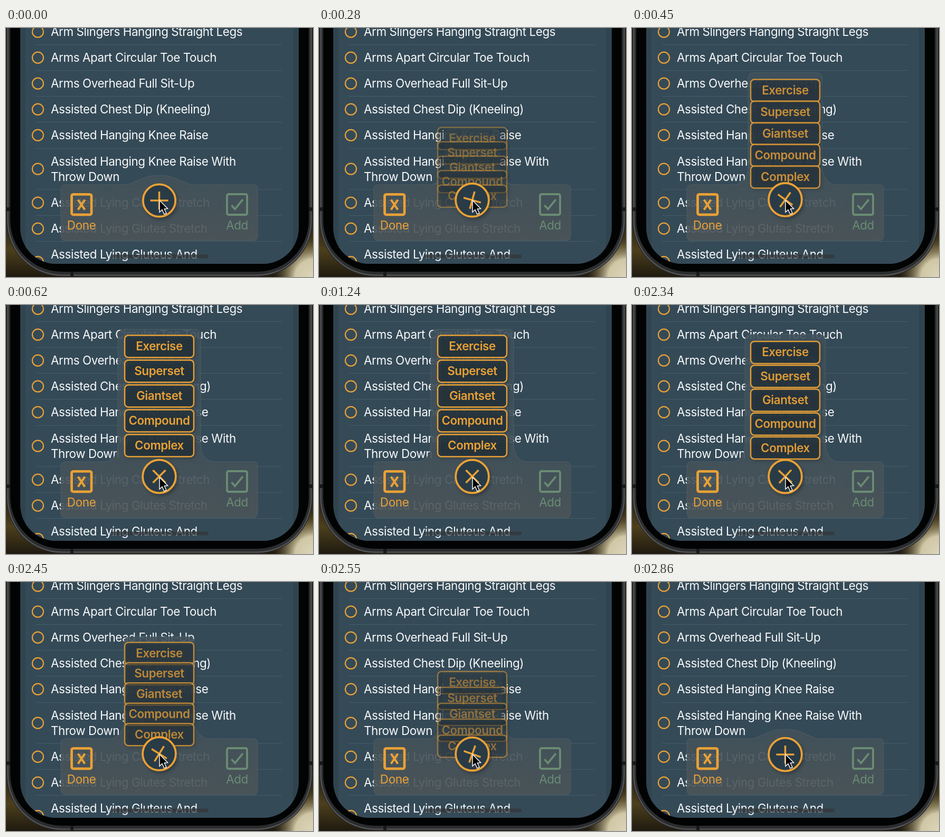
Animation, 582 px wide and 472 px high, one loop 2.9 s. Source, as an HTML page with a canvas:

```html
<!DOCTYPE html>
<html lang="en">
<head>
<meta charset="utf-8">
<title>Exercise picker menu</title>
<style>
html, body { margin: 0; width: 100%; height: 100%; overflow: hidden; background: #1d1810; }
canvas { display: block; }
</style>
</head>
<body>
<canvas id="stage" width="582" height="472"></canvas>
<script>
const ctx = document.getElementById('stage').getContext('2d');
const LOOP = 2900, CX = 290.5;
const ORANGE = '#e9a136', GREEN = '#6a8c73';
const FONT = 'Inter, "Liberation Sans", sans-serif';

const rows = [
  [7, 'Arm Slingers Hanging Straight Legs'],
  [56, 'Arms Apart Circular Toe Touch'],
  [105, 'Arms Overhead Full Sit-Up'],
  [154, 'Assisted Chest Dip (Kneeling)'],
  [203, 'Assisted Hanging Knee Raise'],
  [267, 'Assisted Hanging Knee Raise With', 'Throw Down'],
  [331, 'Assisted Lying Calves Stretch'],
  [380, 'Assisted Lying Glutes Stretch'],
  [443.5, 'Assisted Lying Gluteus And', '']
];
const separators = [31.5, 80.5, 129.5, 178.5, 228.5, 306, 355.5, 404.5];
const options = ['Exercise', 'Superset', 'Giantset', 'Compound', 'Complex'];

const lerp = (a, b, t) => a + (b - a) * t;
const ease = (t, start, length) => {
  const u = Math.min(1, Math.max(0, (t - start) / length));
  return u * u * (3 - 2 * u);
};

function box(x, y, w, h, r, fill, stroke, width) {
  ctx.beginPath();
  ctx.roundRect(x, y, w, h, r);
  paint(fill, stroke, width);
}

function disc(x, y, r, fill, stroke, width) {
  ctx.beginPath();
  ctx.arc(x, y, r, 0, 2 * Math.PI);
  paint(fill, stroke, width);
}

function paint(fill, stroke, width) {
  if (fill) { ctx.fillStyle = fill; ctx.fill(); }
  if (stroke) {
    ctx.shadowColor = 'transparent';
    ctx.strokeStyle = stroke;
    ctx.lineWidth = width;
    ctx.stroke();
  }
}

function line(points, color, width) {
  ctx.beginPath();
  points.forEach(([x, y]) => ctx.lineTo(x, y));
  paint(null, color, width);
}

function label(str, x, y, color, align = 'left', weight = 400) {
  ctx.font = `${weight} 22.4px ${FONT}`;
  ctx.letterSpacing = '-0.4px';
  ctx.textAlign = align;
  ctx.fillStyle = color;
  ctx.fillText(str, x, y + 8);
}

function shadow(alpha, blur, dx, dy) {
  ctx.shadowColor = `rgba(0,0,0,${alpha})`;
  ctx.shadowBlur = blur;
  ctx.shadowOffsetX = dx;
  ctx.shadowOffsetY = dy;
}

function wash(gradient, ...stops) {
  stops.forEach(([at, color]) => gradient.addColorStop(at, color));
  ctx.fillStyle = gradient;
  ctx.fillRect(0, 0, 582, 472);
}

function drawPhone() {
  wash(ctx.createLinearGradient(0, 0, 0, 472),
    [0, '#1d1810'], [0.74, '#1d1810'], [0.89, '#4c3f1c'], [1, '#1f1a10']);
  wash(ctx.createRadialGradient(582, 472, 0, 582, 472, 75),
    [0, '#dcd5bb'], [0.45, '#d0c7a6'], [1, 'rgba(90,78,40,0)']);

  // Nested outlines share the offset between frame and bezel
  [[1, 471, '#2a2a2b'], [2.5, 469.5, '#58595b'], [4.5, 467.5, '#2b2c2e'], [8, 462, '#020303']]
    .forEach(([x, bottom, color]) =>
      box(x, -100, 582 - 2 * x, bottom + 100, 106 - x, color));
  ctx.fillStyle = '#18191a';
  ctx.fillRect(1, 340, 7, 7);
  ctx.fillRect(574, 340, 7, 7);
  ctx.fillRect(122, 462, 6, 9);
}

function drawList() {
  ctx.save();
  ctx.beginPath();
  ctx.roundRect(27, -100, 528, 547, 68);
  ctx.clip();
  ctx.fillStyle = '#30444f';
  ctx.fillRect(27, 0, 528, 447);
  ctx.fillStyle = '#354a57';
  ctx.fillRect(37, 0, 507, 447);
  for (const y of separators) line([[57, y], [523, y]], '#455c69', 1);
  for (const [y, first, second] of rows) {
    disc(60.4, y + 0.2, 10.5, null, ORANGE, 2.2);
    const wraps = second !== undefined;
    label(first, 85, wraps ? y - 14.5 : y, '#f7f9fa');
    if (wraps) label(second, 85, y + 15, '#f7f9fa');
  }
  box(200, 429.5, 184, 7, 3.5, 'rgba(50,55,59,.8)');
  ctx.restore();
}

// Toolbar with a bump that grows into the menu column
function drawPanel(p) {
  const base = 297, top = 46 + 233.5 * Math.pow(1 - p, 1.12);
  const half = lerp(38, 78.5, p), foot = lerp(68, 102, p);
  const side = base - Math.min(32, (base - top) / 2);
  const k = Math.min(1, p * 3);
  const tx = lerp(16, 0, k), ty = lerp(6, 18, k), r = lerp(16, 12, k);
  const shoulder = Math.min(side, top + r);
  const near = x => CX - x, far = x => CX + x;

  ctx.beginPath();
  ctx.moveTo(112, base);
  ctx.lineTo(near(foot), base);
  ctx.bezierCurveTo(near(foot - 12), base, near(half + tx), side + ty, near(half), side);
  ctx.lineTo(near(half), shoulder);
  ctx.quadraticCurveTo(near(half - tx), top, near(half - tx - r), top);
  ctx.lineTo(far(half - tx - r), top);
  ctx.quadraticCurveTo(far(half - tx), top, far(half), shoulder);
  ctx.lineTo(far(half), side);
  ctx.bezierCurveTo(far(half + tx), side + ty, far(foot - 12), base, far(foot), base);
  ctx.arcTo(477, base, 477, 403, 8);
  ctx.arcTo(477, 403, 104, 403, 8);
  ctx.arcTo(104, 403, 104, base, 8);
  ctx.arcTo(104, base, 112, base, 8);
  ctx.closePath();

  const tint = ctx.createLinearGradient(0, 46, 0, 403);
  tint.addColorStop(0, 'rgba(62,80,91,.9)');
  tint.addColorStop(0.65, 'rgba(66,81,89,.9)');
  tint.addColorStop(1, 'rgba(75,84,88,.9)');
  paint(tint, 'rgba(125,135,135,.18)', 1.5);

  box(124.5, 315.3, 37.5, 38.5, 3, null, ORANGE, 4.8);
  line([[136.5, 325.5], [149.5, 344.5]], ORANGE, 4);
  line([[149.5, 325.5], [136.5, 344.5]], ORANGE, 4);
  label('Done', 143, 374, ORANGE, 'center');
  box(419, 315, 38, 39, 3, null, GREEN, 3.8);
  line([[427.5, 336], [434, 343.5], [449, 325]], GREEN, 3.6);
  label('Add', 438, 374, GREEN, 'center');
}

function drawOptions(p) {
  const gap = lerp(17, 47, p), last = lerp(346, 266.5, p);
  options.forEach((name, i) => {
    const y = last - (options.length - 1 - i) * gap;
    ctx.save();
    ctx.globalAlpha = Math.pow(p, 0.8);
    shadow(0.35, 7, 3, 3);
    box(225, y - 21, 131, 42, 7, 'rgba(34,47,56,.7)', ORANGE, 2.5);
    label(name, CX, y - 0.5, ORANGE, 'center', 600);
    ctx.restore();
  });
}

function drawToggle(t, p) {
  ctx.save();
  ctx.translate(CX, 327 - 2 * p);
  shadow(0.4, 9, 3, 4);
  disc(0, 0, lerp(30.7, 31.4, ease(t, 0, 200)), '#293b46', ORANGE, 3.8);
  ctx.rotate(p * Math.PI / 4);
  line([[-17, 0], [17, 0]], ORANGE, 3.5);
  line([[0, -17], [0, 17]], ORANGE, 3.5);
  ctx.restore();
}

function drawCursor() {
  ctx.beginPath();
  [[291, 326.5], [291, 349], [296, 344.5], [300, 353], [304, 351.3], [300.3, 343], [306.5, 342.5]]
    .forEach(([x, y]) => ctx.lineTo(x, y));
  ctx.closePath();
  paint('#050505', '#f4f4f4', 1.5);
}

function frame(now) {
  const t = now % LOOP;
  const p = ease(t, 70, 535) - ease(t, 2264, 530);
  drawPhone();
  drawList();
  drawPanel(p);
  if (p > 0) drawOptions(p);
  drawToggle(t, p);
  drawCursor();
  requestAnimationFrame(frame);
}
frame(0);
</script>
</body>
</html>
```
